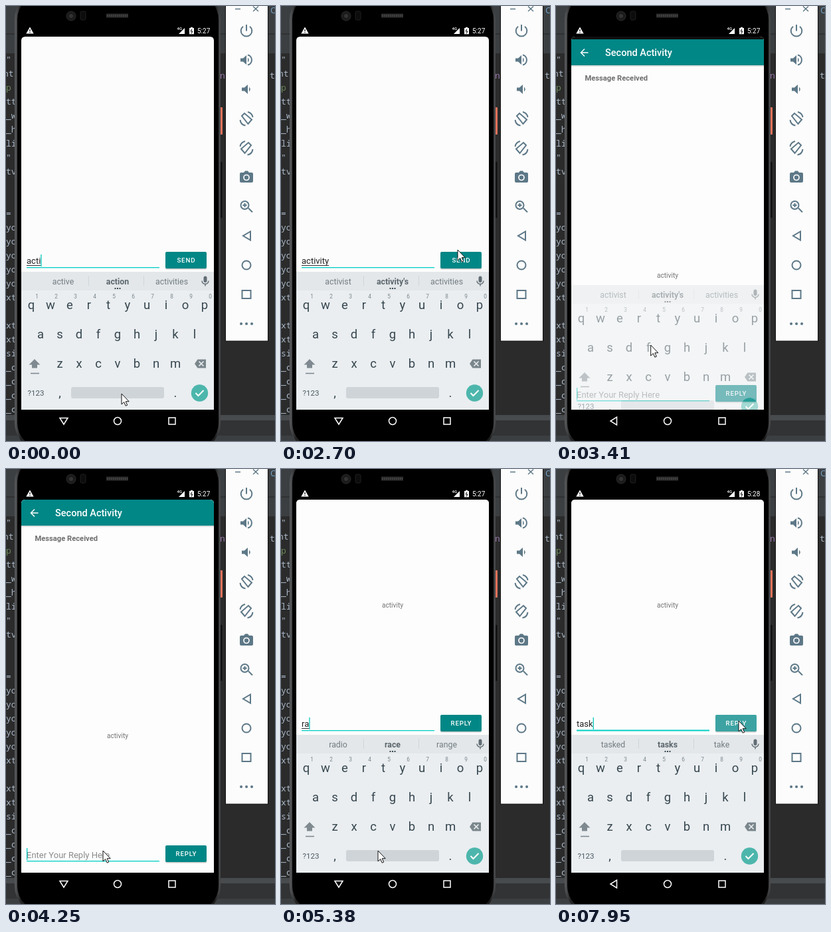
Animation, 405 px wide and 653 px high, one loop 8000 ms. Source, as an HTML page:

```html
<!DOCTYPE html>
<html lang="en">
<head>
<meta charset="utf-8">
<title>Two activities</title>
<style>
  html, body { margin: 0; width: 100%; height: 100%; overflow: hidden; background: #2b2b2b; }
  svg { display: block; width: 405px; height: 653px; font-family: Roboto, sans-serif; }
  text { white-space: pre; }
  .mid { text-anchor: middle; }
  .code { font: 13px 'Noto Sans Mono', monospace; fill: #a9b7c6; }
  .line { fill: none; stroke: currentColor; stroke-width: 2; }
  .button { font-size: 9.7px; font-weight: 500; letter-spacing: .85px; fill: #fff; }
</style>
</head>
<body>
<svg viewBox="0 0 405 653">
  <defs>
    <clipPath id="screen"><path d="M23 606V52q0-6 6-6h278q6 0 6 6v554z"/></clipPath>
    <linearGradient id="rim"><stop stop-color="#5a5c5e"/><stop offset=".03" stop-color="#222"/><stop offset=".97" stop-color="#1a1a1a"/><stop offset="1" stop-color="#4a4c4e"/></linearGradient>
  </defs>

  <g id="ide">
    <rect width="405" height="653" fill="#2b2b2b"/>
    <rect width="405" height="71" fill="#3c3f41"/>
    <rect y="41" width="405" height="2" fill="#2f3133"/>
    <rect y="614" width="405" height="8" fill="#484b4d"/>
    <rect y="622" width="405" height="31" fill="#313335"/>
    <rect y="645" width="405" height="8" fill="#3c3f41"/>
    <text x="322" y="109" class="code" style="fill:#9876aa">n</text>
    <text x="397" y="109" class="code">tt</text>
    <text x="398" y="11" class="code" style="fill:#6f9fc4">C</text>
  </g>

  <g id="phone">
    <rect x="322" y="152" width="4" height="41" rx="1" fill="#e2725b"/>
    <rect x="322" y="234" width="3.5" height="84" rx="1" fill="#111"/>
    <rect x="13" y="-22" width="310" height="690" rx="42" fill="url(#rim)"/>
    <rect x="17" y="-18" width="303" height="682" rx="38" fill="#000"/>
    <circle cx="98" cy="15" r="7" fill="#1b1b1b" stroke="#2b2b2b"/>
    <circle cx="98" cy="15" r="3" fill="#333"/>
    <rect x="112" y="8" width="8" height="13" rx="2" fill="#0c0c0c" stroke="#1e1e1e"/>
    <path d="M151 14.5h33" stroke="#2c2c2c" stroke-width="6"/>
    <path d="M152 14.5h31" stroke="#444" stroke-width="3" stroke-dasharray="1.5 1.5"/>
  </g>

  <g id="status" fill="#fff">
    <path d="M36 31.5l5.7 10H30.3z"/>
    <path d="M36 35v3m0 1v1.3" stroke="#000" stroke-width="1.2"/>
    <text x="257.5" y="36" font-size="6" font-weight="500">4G</text>
    <path d="M269 33v9h-9z"/>
    <path d="M276 33h2v-1.300h3V33h2v9.300h-7z"/>
    <path d="M280 34.500l-2 3.500h3l-2 3.300" fill="none" stroke="#000"/>
    <text id="clock" x="288" y="41" font-size="10"></text>
  </g>

  <g id="nav" class="line" color="#fff" style="stroke-width:1.5">
    <path id="back" d="M81 618.500h12l-6 9.500z"/>
    <circle cx="168" cy="623" r="5.500"/>
    <rect x="245" y="618" width="10" height="10"/>
  </g>

  <g clip-path="url(#screen)">
    <rect x="23" y="46" width="290" height="560" fill="#fcfcfc"/>
    <g id="first"></g>
    <g id="second">
      <rect x="23" y="-400" width="290" height="250" fill="#101010"/>
      <rect x="23" y="-150" width="290" height="900" fill="#fdfdfd"/>
      <rect x="23" y="-111" width="290" height="2" fill="#000" opacity=".12"/>
      <rect x="23" y="-150" width="290" height="39" fill="#018786"/>
      <path class="line" color="#fff" style="stroke-width:1.500" d="M48.500-130H37.500m5.500-5.500l-5.500 5.500 5.500 5.500"/>
      <text x="74" y="-125" font-size="14.5" font-weight="500" fill="#fff">Second Activity</text>
      <text x="43.500" y="-88" font-size="11.2" font-weight="700" fill="#6e6e6e">Message Received</text>
      <text class="mid" x="168" y="207.500" font-size="10.1" fill="#757575">activity</text>
    </g>
    <g id="keyboard">
      <rect x="23" y="399" width="290" height="207" fill="#eaeef1"/>
      <rect x="23" y="399" width="290" height="28" fill="#e3e7e9"/>
      <path d="M124.500 405v15m83-15v15" stroke="#d0d5d8"/>
      <path d="M163.500 424h2m1.500 0h2m1.500 0h2" stroke="#37474f" stroke-width="2"/>
      <g fill="#626d74" color="#626d74">
        <rect x="297.500" y="405.500" width="5" height="9.500" rx="2.500"/>
        <path class="line" style="stroke-width:1.400" d="M295 412.500a5 4.800 0 0 0 10 0m-5 4.800v3.200"/>
      </g>
      <path d="M43 530l8.500 8.500H47v5h-8v-5h-4.500z" fill="#7f8a90"/>
      <path d="M37 551.500h13" stroke="#7f8a90" stroke-width="1.600"/>
      <path d="M284 537l4.500-6.500H301v13h-12.500z" fill="#7a868c"/>
      <path d="M290.500 533.500l7 7m0-7l-7 7" stroke="#eaeef1" stroke-width="1.600"/>
      <rect x="98" y="572" width="140" height="17" rx="3" fill="#cfd4d8"/>
      <circle cx="291.500" cy="581" r="12.700" fill="#4db6ac"/>
      <path class="line" color="#fff" d="M285.500 581l4 4 8-8"/>
    </g>
  </g>

  <g id="panel" color="#5d7887" fill="#5d7887">
    <rect x="330.500" y="-5" width="64" height="508" fill="#fcfcfc" stroke="#111"/>
    <path class="line" style="stroke-width:1.400" d="M345 4.500h8m19-4l8 7.500m0-7.500l-8 7.500"/>
    <path class="line" d="M362 28v9.500m-5-6.800a8.300 8.300 0 1 0 10 0"/>
    <path d="M353 78.500h4l5-4.500v14l-5-4.500h-4zm11-1q3.500 3.500 0 7zM355 122.500h4l5-4.500v14l-5-4.500h-4zm11-1q3.500 3.500 0 7z"/>
    <path class="line" d="M364 73.500a7.700 7.700 0 0 1 0 15"/>
    <path id="rotate" class="line" d="M355 165l4-4 11 9.500-5.500 6.500zM352.500 171a10 10 0 0 0 8 8.500M364 159a10 10 0 0 1 7.500 8"/>
    <use href="#rotate" transform="matrix(-1 0 0 1 724 44)"/>
    <path d="M354 250h4l2-2.500h4l2 2.500h4q2 0 2 2v11q0 2-2 2h-16q-2 0-2-2v-11q0-2 2-2z"/>
    <circle cx="362" cy="257.500" r="4" fill="none" stroke="#fcfcfc" stroke-width="1.700"/>
    <path class="line" d="M365 303.500l6 6M356.500 299h6m-3-3v6M368 338.500v13l-11-6.500z"/>
    <circle class="line" cx="359.500" cy="299" r="6"/>
    <circle class="line" cx="362" cy="389" r="6.500"/>
    <rect class="line" x="355.500" y="427" width="13" height="12"/>
    <path d="M354 477h.1m7.900 0h.1m7.900 0h.1" stroke="currentColor" stroke-width="4" stroke-linecap="round"/>
  </g>

  <path id="mouse" d="M0 0v16l3.700-3.500 2.500 5.700 2.500-1.100-2.500-5.400h5z" fill="#fff" stroke="#111"/>
</svg>

<script>
const LOOP = 8000;
const $ = id => document.getElementById(id);
const add = (id, markup) => $(id).insertAdjacentHTML('beforeend', markup);
const label = (x, y, size, fill, text) =>
  `<text class="mid" x="${x}" y="${y}" font-size="${size}" fill="${fill}">${text}</text>`;

// Scenery
'"|nt|p|tt|_w|_h|li|"|tv|||=|yo|yo|yo|yo|yo|xt||xt|xt|si|_c|_c|_c|_c'.split('|').forEach((word, i) => {
  const fill = i === 2 ? '#6a8759' : '#a9b7c6';
  add('ide', `<text x="${word === 'nt' ? -4 : 0}" y="${85 + 21 * i}" class="code" style="fill:${fill}">${word}</text>`);
});

// Keys
[['qwertyuiop', 38], ['asdfghjkl', 52], ['zxcvbnm', 81]].forEach(([keys, x], row) => {
  [...keys].forEach((key, i) => {
    add('keyboard', label(x + 29 * i, 455 + 44 * row, 18.5, '#37474f', key));
    if (!row) add('keyboard', label(46.5 + 29 * i, 439, 8.3, '#7b868c', (i + 1) % 10));
  });
});
add('keyboard', label(45, 585, 11.5, '#4a5a62', '?123') +
  label(81, 587, 18.5, '#37474f', ',') + label(255, 587, 18.5, '#37474f', '.'));
const words = [86, 168, 249.5].map((x, i) => {
  add('keyboard', label(x, 418, 12.3, i === 1 ? '#5b666d' : '#727c83', ''));
  const word = $('keyboard').lastElementChild;
  if (i === 1) word.setAttribute('font-weight', 700);
  return word;
});

// Text field with its button
function makeEditor(id, hint, action) {
  add(id, `
    <text class="hint" x="31" y="388" font-size="13" fill="#8a8a8a">${hint}</text>
    <text class="value" x="31" y="387" font-size="13" fill="#222"></text>
    <rect class="underline" x="31" y="389" height="1" fill="#333"/>
    <rect class="caret" y="373" width="1.3" height="18" fill="#03c9bd"/>
    <rect class="rule" x="31" width="200" fill="#03cfc4"/>
    <rect x="240" y="370.500" width="62" height="25" rx="2" fill="#000" opacity=".2"/>
    <rect x="240" y="369" width="62" height="25" rx="2" fill="#018786"/>
    <rect class="ripple" x="240" y="369" width="62" height="25" rx="2" fill="#fff" opacity=".23"/>
    <text class="mid button" x="271.4" y="385">${action}</text>`);
  const part = name => $(id).querySelector('.' + name);
  const [hintText, value, underline, caret, rule, ripple] =
    ['hint', 'value', 'underline', 'caret', 'rule', 'ripple'].map(part);
  const show = (node, on) => node.setAttribute('visibility', on ? 'inherit' : 'hidden');
  return (t, [since, text], pressed) => {
    value.textContent = text;
    const width = text ? value.getComputedTextLength() : 0;
    underline.setAttribute('width', width);
    caret.setAttribute('x', 31 + width);
    rule.setAttribute('y', pressed ? 391.5 : 392);
    rule.setAttribute('height', pressed ? 2 : 1.3);
    show(hintText, !text);
    show(underline, !pressed);
    show(caret, (t - since) % 1000 < 500);
    show(ripple, pressed);
  };
}
const drawFirst = makeEditor('first', '', 'SEND');
const drawSecond = makeEditor('second', 'Enter Your Reply Here', 'REPLY');

// Timeline: the picture advances in bursts of [start, end, steps]
const moments = [
  [0, 0, 1], [120, 120, 1], [390, 510, 2], [970, 1960, 8], [2250, 3270, 8], [3410, 4250, 7],
  [4500, 4650, 2], [4960, 5380, 4], [5820, 5820, 1], [6090, 6750, 6], [7050, 7950, 8],
].flatMap(([from, to, n]) => Array.from({ length: n }, (_, i) => from + (to - from) * i / Math.max(1, n - 1)));

const message = [[-390, 'acti'], [390, 'activ'], [970, 'activi'], [1394, 'activit'], [1818, 'activity']];
const reply = [[0, ''], [4000, ''], [4960, 'r'], [5240, 'ra'], [5820, 'r'], [6090, ''],
  [6222, 't'], [6354, 'ta'], [6486, 'tas'], [6618, 'task']];
const suggestions = [
  [0, 'active action activities'], [510, 'active activity activities'],
  [1960, "activist activity's activities"], [4000, ''], [5100, 'read really right'],
  [5380, 'radio race range'], [6090, ''], [6354, 'the to this'],
  [6486, 'take talk table'], [6750, 'tasked tasks take'],
];
const pointer = [[2100, 174, 582], [2687, 266, 366], [2979, 266, 366], [3270, 141, 477],
  [3690, 146, 573], [6920, 146, 573], [7564, 275, 378]];
const opening = [[2979, 60, 0], [3270, 12, .9], [3410, 4, 1], [3550, 0, 1]];
const keys = [[3270, 1], [3550, 0], [4250, 0], [4650, 1]];
const panning = [[4250, 0], [4650, 1]];

const latest = (list, t) => list.findLast(([time]) => time <= t);

// Linear interpolation of all values after the time in each point
function track(points, t) {
  const next = points.findIndex(([time]) => time > t);
  if (next === 0) return points[0].slice(1);
  if (next < 0) return points.at(-1).slice(1);
  const [a, b] = [points[next - 1], points[next]];
  const k = (t - a[0]) / (b[0] - a[0]);
  return a.slice(1).map((v, i) => v + (b[i + 1] - v) * k);
}

function place(id, x, y, opacity = 1) {
  $(id).setAttribute('transform', `translate(${x} ${y})`);
  $(id).setAttribute('opacity', opacity);
}

function draw(t) {
  drawFirst(t, latest(message, t), t >= 2830);
  drawSecond(t, latest(reply, t), t >= 7821);
  const picks = latest(suggestions, t)[1].split(' ');
  words.forEach((word, i) => word.textContent = picks[i] || '');

  const [offset, alpha] = track(opening, t);
  const [pan] = track(panning, t);
  const [shown] = track(keys, t);
  const [x, y] = track(pointer, t);
  place('second', 0, 196 * (1 - pan) + offset, alpha);
  place('keyboard', 0, 40 * (1 - shown), shown);
  place('mouse', x, y);

  const closing = t >= 3270 && t < 4250 || t >= 7950;
  $('back').setAttribute('transform', `rotate(${closing ? 90 : 0} 87 623)`);
  $('clock').textContent = t < 6486 ? '5:27' : '5:28';
}

function frame() {
  const t = performance.now() % LOOP;
  draw(moments.findLast(moment => moment <= t));
  requestAnimationFrame(frame);
}
frame();
</script>
</body>
</html>
```
